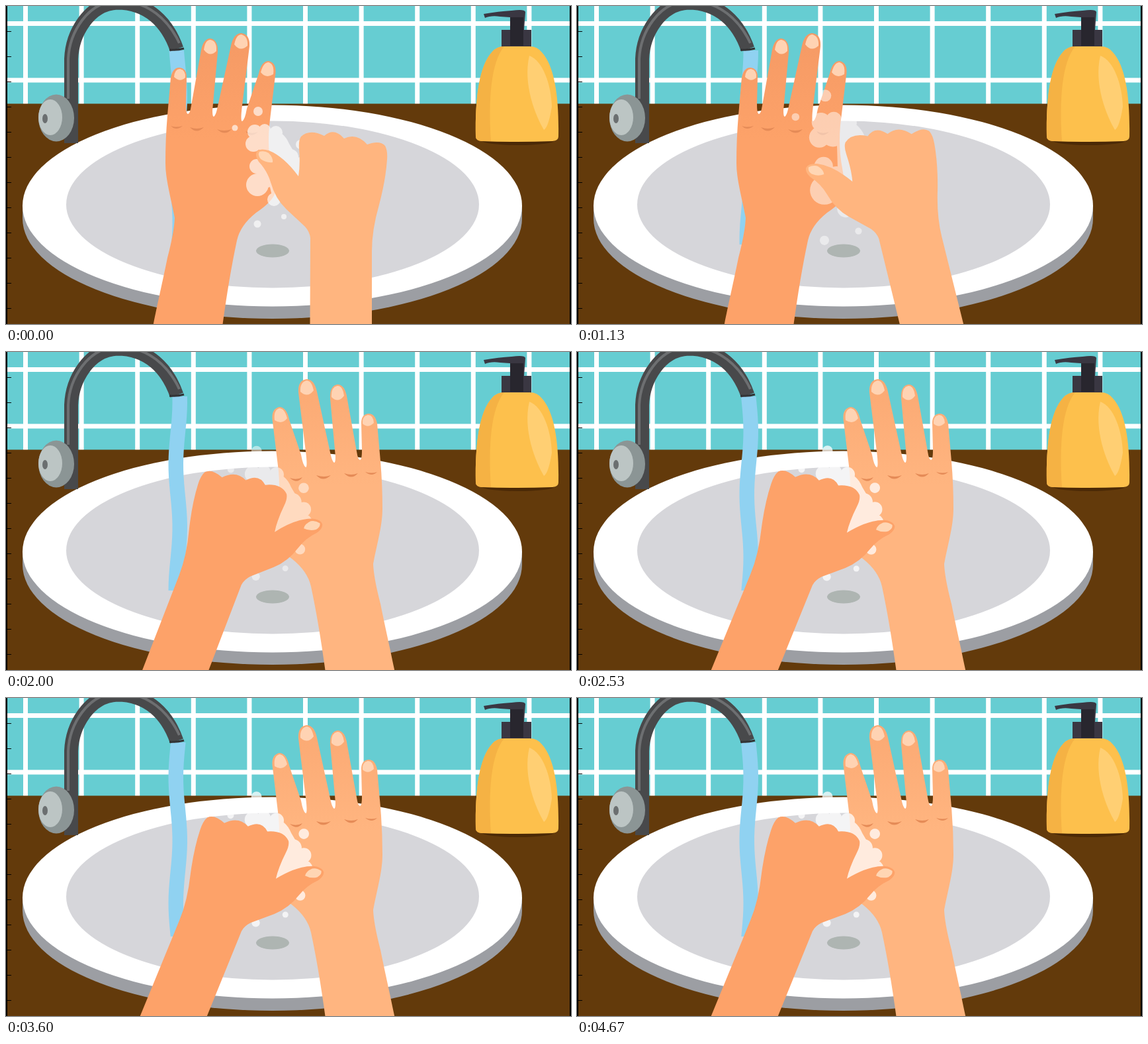
Write an HTML page that moves like this. It is 854x480 px and loops after 4740 ms.

```html
<!DOCTYPE html>
<html lang="en">
<head>
<meta charset="utf-8">
<title>Washing hands</title>
<style>
  html, body { margin: 0; width: 100%; height: 100%; overflow: hidden; background: #000; }
  svg { display: block; width: 100%; height: 100%; }
</style>
</head>
<body>
<svg viewBox="0 0 854 480">
  <defs>
    <linearGradient id="dark" x2="0" y2="1">
      <stop stop-color="#f59a65"/><stop offset=".36" stop-color="#fda269"/>
    </linearGradient>
    <linearGradient id="light" x2="0" y2="1">
      <stop stop-color="#fba973"/><stop offset=".36" stop-color="#ffb580"/>
    </linearGradient>

    <g id="open">
      <path d="M222 484C231 440 238 410 244 380Q254 342 255 320C249 288 241 262 241 237Q241 200 244 165L249 108Q252 93 262 93Q273 94 273 107L272 148Q272 163 275 163Q278 163 280 150L294 72Q297 49 309 49Q321 51 320 70L312 158Q312 167 314 167Q317 165 319 156L340 60Q344 41 356 41Q369 43 368 61L357 150Q354 174 357 174Q361 172 364 155L382 102Q386 83 397 83Q410 86 407 105L398 180Q395 215 401 245L407 282Q402 296 378 312Q354 331 349 354Q337 410 327 484Z"/>
      <g fill="#ffd3b3">
        <path d="M254 107Q255 95 263 95Q272 97 271 108Q263 116 254 107Z"/>
        <path d="M299 66Q301 51 309 51Q319 53 318 68Q308 78 299 66Z"/>
        <path d="M345 58Q348 43 356 43Q366 46 365 60Q354 70 345 58Z"/>
        <path d="M385 100Q389 85 397 85Q406 88 404 103Q393 110 385 100Z"/>
      </g>
      <path fill="#e58b57" d="M249 181Q257 184 267 181Q257 189 249 181ZM278 183Q288 187 299 183Q288 194 278 183ZM319 186Q329 190 341 186Q331 197 319 186ZM362 189Q371 194 381 190Q370 200 362 189Z"/>
    </g>

    <g id="fist">
      <path d="M459 620L460 350Q459 341 452 333L424 307Q407 291 400 266Q395 249 382 235Q376 226 379 220Q384 214 397 218Q420 227 442 257Q445 240 443 215Q442 203 446 197Q459 185 481 196Q496 183 511 200Q530 191 546 209Q565 202 573 211Q577 218 576 232Q574 262 564 300Q553 338 553 370V620Z"/>
      <path fill="#ffd6b4" d="M383 220Q391 218 397 222Q404 229 403 236Q393 237 385 231Q380 225 383 220Z"/>
    </g>

    <g id="foam" fill="#fff"></g>
  </defs>

  <path fill="#66cdd2" d="M0 0H854V150H0Z"/>
  <path id="grout" stroke="#fff" stroke-width="7"/>
  <path fill="#633a0b" d="M0 147.500H854V480H0Z"/>

  <path fill="#9c9ea3" d="M25 301H780V321A377.500 151 0 0 1 25 321Z"/>
  <ellipse cx="402.500" cy="301.500" rx="377.500" ry="152" fill="#fff"/>
  <ellipse cx="403" cy="299.500" rx="312" ry="126" fill="#d6d6da"/>
  <ellipse cx="403" cy="369.500" rx="25" ry="10" fill="#aeb5b2"/>

  <path id="water" fill="#90d2f1"/>

  <g fill="none">
    <path stroke="#48494b" stroke-width="21" d="M98.500 207V80C100 42 125 -3 168 -5C215 -5 244 25 258 65"/>
    <path stroke="#6d6f71" stroke-width="4" d="M94 140V80C96 40 123 -6 168 -8C216 -8 246 22 262 56"/>
    <path stroke="#333436" stroke-width="3" d="M247 66Q259 67 269 64"/>
  </g>
  <ellipse cx="76" cy="169" rx="27" ry="35.500" fill="#8b9595"/>
  <ellipse cx="67" cy="168" rx="18" ry="27" fill="#bcc5c4"/>
  <ellipse cx="59" cy="170" rx="4" ry="7" fill="#6b6f70"/>

  <ellipse cx="774" cy="203" rx="55" ry="7" fill="#4b2906"/>
  <path fill="#3a3742" d="M749 36H762V17L747 16Q733 14 724 18L722 12Q745 8 764 7Q784 4 785 9L783 36H794V63H749Z"/>
  <path fill="#28262e" d="M762 17H782V60H762Z"/>
  <path fill="#fdc04c" d="M710 197C709 140 715 90 735 69Q742 61 753 61H792Q803 61 810 70C830 92 836 140 835 197Q835 203 826 204Q772 206 719 204Q710 203 710 197Z"/>
  <path fill="#f5b244" d="M710 197C709 140 715 90 735 69Q742 61 753 61C733 85 729 140 733 204L719 204Q710 203 710 197Z"/>
  <path fill="#ffcf73" d="M791 75C811 82 824 118 825 152Q820 183 813 187C800 165 781 118 791 75Z"/>

  <g id="first">
    <use href="#open" fill="url(#dark)"/>
    <use href="#foam" id="foamA"/>
    <use href="#fist" id="fistA" fill="#ffb57f"/>
  </g>
  <g id="second">
    <g transform="translate(810) scale(-1 1)"><use href="#open" fill="url(#light)"/></g>
    <use href="#foam" id="foamB"/>
    <g transform="translate(810) scale(-1 1)"><use href="#fist" id="fistB" fill="#fda269"/></g>
  </g>
  <path d="M0 0H2V480H0ZM852 0H854V480H852Z"/>
  <path id="ticks" stroke="#000"/>
</svg>
<script>
const LOOP = 4740, TAU = 2 * Math.PI;
const $ = id => document.getElementById(id);
const set = (id, name, value) => $(id).setAttribute(name, value);
const ramp = (t, start, length) => Math.min(1, Math.max(0, (t - start) / length));
const repeat = (n, fn) => Array.from({ length: n }, (_, i) => fn(i)).join('');

set('grout', 'd', 'M0 26.5H854M0 112H854' + repeat(11, i => `M${29.5 + 84.6 * i} 0V148`));
set('ticks', 'd', repeat(12, i => `M2 ${38.5 + 38 * i}h6`));

// x, y, radius of each bubble
const bubbles = [
  [381, 159, 7], [346, 184, 4.5], [380, 329, 5.5], [420, 318, 4], [445, 209, 7],
  [376, 190, 11], [391, 187, 9], [408, 191, 10], [374, 208, 12], [390, 205, 14],
  [379, 242, 11], [380, 270, 17], [394, 258, 16], [405, 292, 10], [440, 292, 7],
  [445, 238, 10], [446, 256, 11], [430, 228, 12]
];
$('foam').innerHTML = bubbles.map(([x, y, r]) => `<circle cx="${x}" cy="${y}" r="${r}"/>`).join('') +
  '<path d="M394 190Q418 184 428 208L447 240L444 266L405 300L396 260Z"/>';

function waterPath(t) {
  const edge = (x, y) => `${x + 3 * Math.sin(TAU * ((y - 72) / 190 - (t - 2530) / 428))} ${y}`;
  const side = (x, from, step) => Array.from({ length: 30 }, (_, i) => edge(x, from + step * i));
  return 'M' + [...side(248.5, 67, 10.1), ...side(271, 360, -10.1)].join('L') + 'Z';
}

function setFoam(id, scale, opacity) {
  set(id, 'transform', `translate(401 242) scale(${scale}) translate(-401 -242)`);
  set(id, 'opacity', opacity);
}

// Rocks a fist about its wrist, angle in radians
const setFist = (id, angle) => set(id, 'transform', `rotate(${-angle * 360 / TAU} 462 366)`);

function draw(t) {
  set('water', 'd', waterPath(t));

  const a = TAU * t / 440, swing = 1 - Math.cos(a);
  setFist('fistA', 0.128 * swing);
  setFoam('foamA', 1 + 0.15 * swing, (0.64 - 0.08 * swing) * (1 - ramp(t, 1550, 150)));

  const b = TAU * (t - 2530) / 535;
  const rub = 0.39 + 0.08 * (1 - Math.cos(b));
  setFist('fistB', 0.35 + (rub - 0.35) * ramp(t, 1900, 200));
  setFoam('foamB', 1.12 - 0.1 * Math.sin(b), (0.74 + 0.07 * Math.sin(b)) * ramp(t, 1900, 150));

  const fade = ramp(t, 1630, 300);
  set('first', 'opacity', 1 - fade);
  set('second', 'opacity', fade);
}

function tick() {
  draw(performance.now() % LOOP);
  requestAnimationFrame(tick);
}
tick();
</script>
</body>
</html>
```
